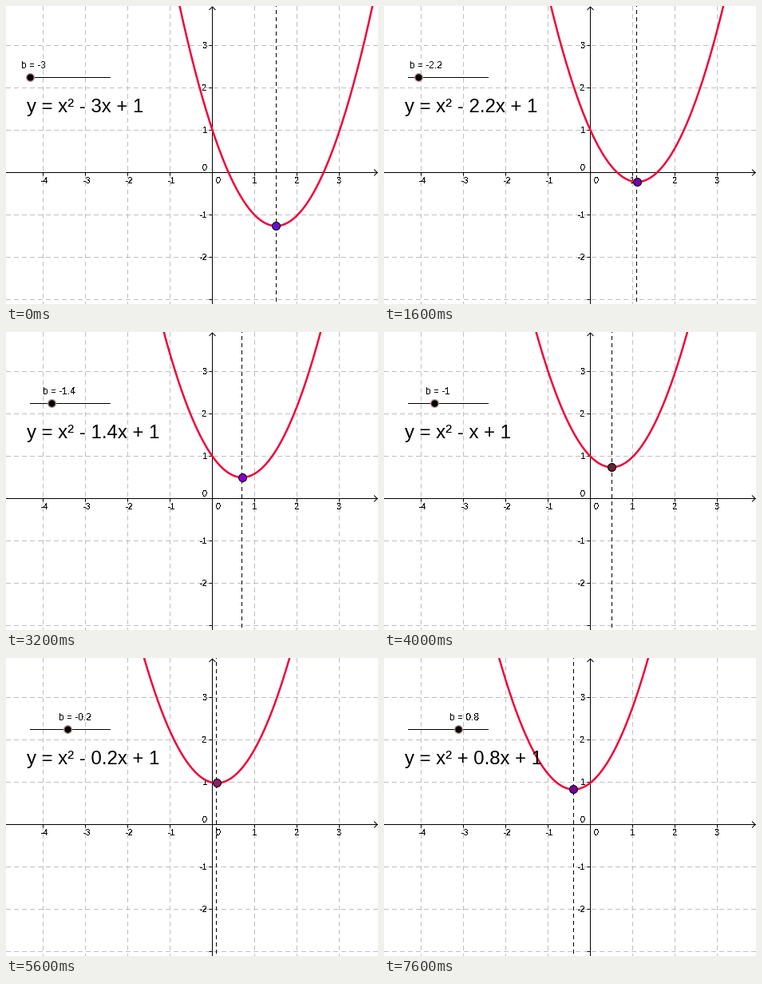
A matplotlib script that plays this animation: 466 by 373 pixels, repeating every 8 s.

```python
import numpy as np
import matplotlib.pyplot as plt
from matplotlib.animation import FuncAnimation
from matplotlib.patches import Circle

W, H = 466, 373
OX, OY, UNIT = 258.6, 208.6, 53
PX = 0.72  # points per pixel at 100 dpi
FRAMES, STEP_MS = 20, 400

plt.rcParams["font.family"] = "Liberation Sans"
fig = plt.figure(figsize=(W / 100, H / 100), dpi=100, facecolor="white")
ax = fig.add_axes([0, 0, 1, 1])
ax.set_xlim(0, W)
ax.set_ylim(H, 0)
ax.axis("off")


def pixel(v):
    """Centre of the pixel that contains v."""
    return np.floor(v + 1e-6) + 0.5


def nearest(v):
    """Centre of the pixel whose index is v rounded."""
    return pixel(v + 0.5)


def line(xs, ys, color="black", width=1, z=2, dash=None):
    style = (0, dash) if dash else "-"
    return ax.plot(xs, ys, color=color, lw=width * PX, ls=style, zorder=z,
                   snap=False, solid_capstyle="butt", dash_capstyle="butt")[0]


def label(x, y, text, size, ha="left", z=3, smooth=False):
    return ax.text(x, y, text, fontsize=size * PX, ha=ha, va="baseline",
                   zorder=z, antialiased=smooth)


def disc(x, y, radius, color, edge="none", z=6):
    return ax.add_patch(Circle((x, y), radius, facecolor=color, edgecolor=edge,
                               lw=PX, zorder=z, snap=False))


def draw_plane():
    ox, oy = pixel(OX), pixel(OY)
    for n in range(-4, 4):
        if n == 0:
            continue
        x, y = ox + n * UNIT, oy - n * UNIT
        line([x, x], [0, H], "#c0c0c0", z=1, dash=(6, 4))
        line([x, x], [oy, oy + 4])
        label(x + (-0.5 if n > 0 else 1.5), 222, str(n), 11, "center")
        if n > -4:
            line([0, W], [y, y], "#c0c0c0", z=1, dash=(6, 4))
            line([ox - 4, ox], [y, y])
            if n > -3:
                label(252, y + 3.5, str(n), 11, "right")
    label(266, 222, "0", 11, "center")
    label(252, 206, "0", 11, "right")
    line([0, W], [oy, oy])
    line([ox, ox], [1, H])
    line([W - 5, W - 1, W - 5], [oy - 4, oy, oy + 4])
    line([ox - 4, ox, ox + 4], [5, 1, 5])


def formula(b):
    if b == 0:
        return "y = x² + 1"
    factor = "" if abs(b) == 1 else f"{abs(b):g}"
    return f"y = x² {'-' if b < 0 else '+'} {factor}x + 1"


# Shade of the vertex from each step onwards
SHADES = {0: "#6611cc", 3: "#7700aa", 7: "#8800cc", 10: "#662233",
          13: "#882266", 16: "#992233", 18: "#770099"}

draw_plane()
line([30, 131], [89.5, 89.5])
x = np.linspace(-5, 4, 600)
curve = line(OX + 0.2 + x * UNIT, OY - x * UNIT, "#ee0838", 2.5, z=4)
symmetry = line([OX, OX], [370, 0], z=5, dash=(5, 4))
vertex = disc(OX, OY, 5, SHADES[0], "black")
halo = disc(30.5, 89.5, 5.6, "#b8a0a0")
knob = disc(30.5, 89.5, 4.2, "black", z=7)
value = label(19, 78, "", 12, z=8)
equation = label(26, 133, "", 24, z=8, smooth=True)


def update(step):
    b = (step - 15) / 5
    vx, vy = OX - b / 2 * UNIT, OY - (1 - b * b / 4) * UNIT
    curve.set_ydata(OY + 0.4 - (x * x + b * x + 1) * UNIT)
    symmetry.set_xdata([pixel(vx)] * 2)
    vertex.center = nearest(vx), nearest(vy)
    vertex.set_facecolor(SHADES[max(k for k in SHADES if k <= step)])
    slider = nearest(30 + (b + 3) * 100 / 6)
    halo.center = knob.center = (slider, 89.5)
    value.set_x(slider - 11.5)
    value.set_text(f"b = {b:g}")
    equation.set_text(formula(b))
    return curve, symmetry, vertex, halo, knob, value, equation


anim = FuncAnimation(fig, update, frames=FRAMES, interval=STEP_MS,
                     repeat=True, repeat_delay=0)
plt.show()
```
